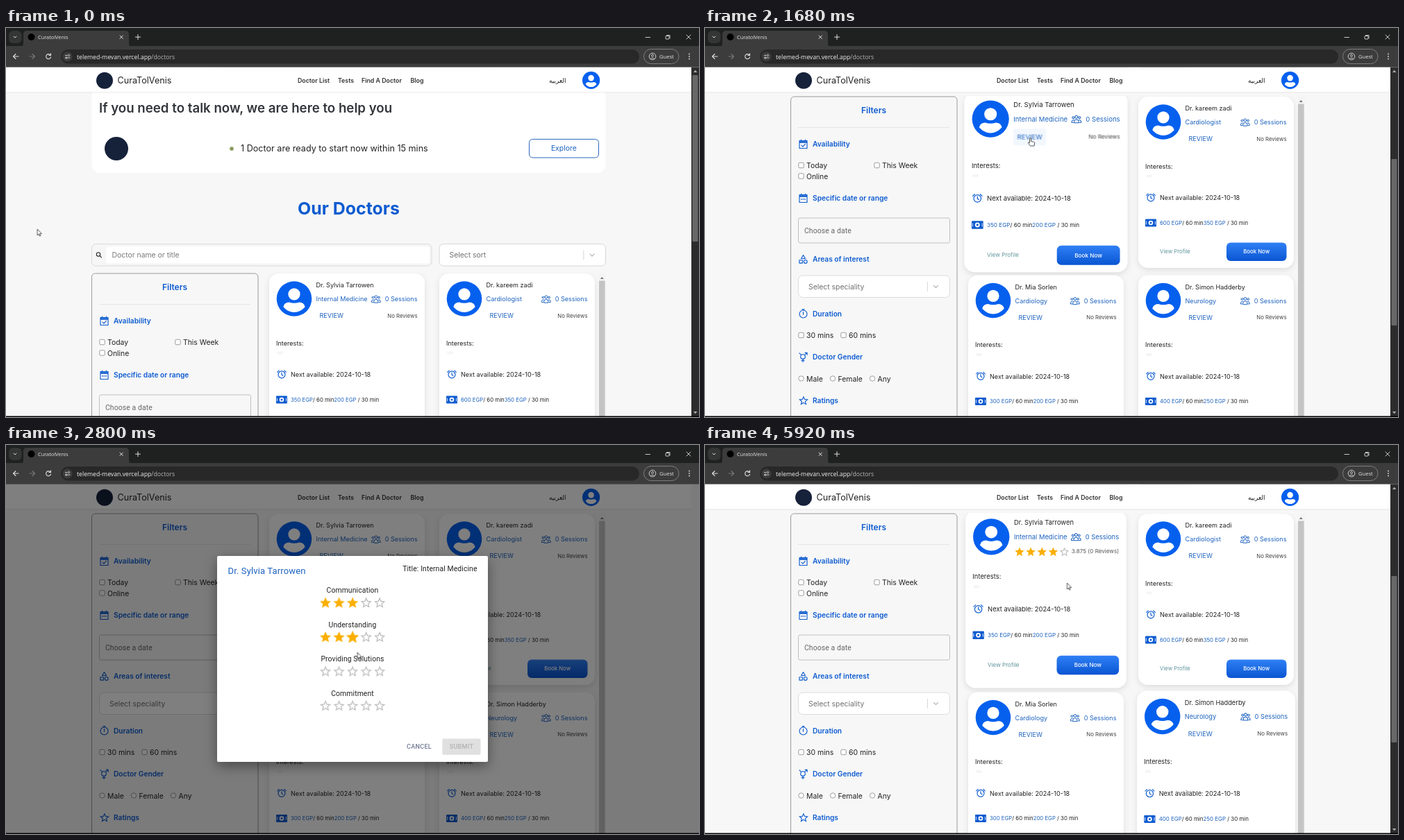
An HTML page that plays this animation: 998x561 px, repeating every 6 s.

```html
<!DOCTYPE html>
<html lang="en">
<head>
<meta charset="utf-8">
<title>Doctors</title>
<style>
  html, body { margin: 0; width: 100%; height: 100%; overflow: hidden; background: #f7f7f7; }
  svg { display: block; width: 998px; height: 561px; font-family: Inter, sans-serif; }
  .ui { font-family: "Open Sans", sans-serif; }
  .roboto { font-family: Roboto, sans-serif; letter-spacing: .1px; }
  .button { font-family: Roboto, sans-serif; font-weight: 500; letter-spacing: .26px; }
  .arabic { font-family: "DejaVu Sans", "Noto Sans", sans-serif; }
  .card { transform-origin: 112px 123.5px; }
  .star { transform-origin: 12px 12px; }
  .paper { filter: drop-shadow(0 6px 9px rgba(0, 0, 0, .4)); }
  .lift { filter: drop-shadow(0 3px 4px rgba(0, 0, 0, .1)); }
  .raised { filter: drop-shadow(0 1px 2px rgba(0, 0, 0, .35)); }
</style>
</head>
<body>
<svg id="stage" viewBox="0 0 998 561"></svg>
<script>
const DURATION = 6000, STEP = 80, SCROLL = 255;
const OPEN = 1735, CLOSE = 5500, CLOSED = 5695;
const BLUE = '#0560ee', HEAD = '#0d5bd0', LINK = '#1e63bf', INK = '#222', GOLD = '#faaf00';
const BRAND = 'CuraTolVenis';

// Markup helpers
const rect = (x, y, w, h, fill, r = 0, more = '') =>
  `<rect x="${x}" y="${y}" width="${w}" height="${h}" rx="${r}" fill="${fill}" ${more}/>`;
const circle = (x, y, r, fill, more = '') => `<circle cx="${x}" cy="${y}" r="${r}" fill="${fill}" ${more}/>`;
const text = (x, y, str, size, fill = INK, more = '') =>
  `<text x="${x}" y="${y}" font-size="${size}" fill="${fill}" ${more}>${str}</text>`;
const line = (d, color, width = 1) =>
  `<path d="${d}" fill="none" stroke="${color}" stroke-width="${width}" stroke-linecap="round" stroke-linejoin="round"/>`;
const shape = (d, fill, more = '') => `<path d="${d}" fill="${fill}" ${more}/>`;
const at = (x, y, content, scale = 1) => `<g transform="translate(${x} ${y}) scale(${scale})">${content}</g>`;
const group = (id, content, more = '') => `<g id="${id}" ${more}>${content}</g>`;
const border = (color, width = 1) => `stroke="${color}" stroke-width="${width}"`;
const MIDDLE = 'text-anchor="middle"', END = 'text-anchor="end"', SEMI = 'font-weight="600"';

const ring = (x, y, r) => `M${x - r} ${y}a${r} ${r} 0 1 0 ${2 * r} 0a${r} ${r} 0 1 0 ${-2 * r} 0`;
const CALENDAR = 'M-5.5 -5h11v11h-11zM-5.5 -2.4h11M-5.5 -3.6h11M-3 -6.4v1.4M3 -6.4v1.4';
const ICONS = {
  check: CALENDAR + 'M-2.6 1.6l2 2 3.4 -3.8',
  range: CALENDAR + 'M-3 1.4h1M-.5 1.4h1M2 1.4h1',
  shapes: 'M0 -6l3 5h-6zM-5.6 1.2h4.4v4.4h-4.4z' + ring(3.2, 3.4, 2.4),
  clock: ring(0, 0, 5.5) + 'M0 -3v3.8M-1.5 -6.6h3',
  gender: ring(-.5, -.8, 3.3) + 'M2 -3.2l3.5 -3.3M2.6 -6.5h3v3M-.5 2.6v4.2M-2.5 4.8h4M-3 -3.4l-2.6 -2.6',
  people: ring(0, -3, 1.9) + ring(-4.3, -2.2, 1.4) + ring(4.3, -2.2, 1.4) +
    'M-3 5v-1.5a3 3 0 0 1 6 0v1.5zM-3.6 1.2a2.5 2.5 0 0 0 -2.9 2.4v1h2.4M3.6 1.2a2.5 2.5 0 0 1 2.9 2.4v1h-2.4',
  alarm: ring(0, .3, 5) + 'M0 -2.5v3l2 1.3M-6.3 -3.2l2.5 -2.4M6.3 -3.2l-2.5 -2.4',
  chevron: 'M-3 -1.5l3 3 3 -3'
};
const icon = (name, x, y, color = HEAD, width = 1.15) => at(x, y, line(ICONS[name], color, width));

const STAR = 'M12 17.27 18.18 21 16.54 13.97 22 9.24 14.81 8.63 12 2 9.19 8.63 2 9.24 7.46 13.97 5.82 21z';
const HALF_STAR = 'M12 17.27 5.82 21 7.46 13.97 2 9.24 9.19 8.63 12 2z';
const STAR_LINE = STAR + 'M12 15.4 8.24 17.67 9.24 13.39 5.92 10.51 10.3 10.13 12 6.1 13.71 10.14 18.09 10.52 14.77 13.4 15.77 17.68z';
const starLine = (color, more = '') => shape(STAR_LINE, color, 'fill-rule="evenodd" ' + more);

const avatar = (x, y, r) => at(x, y, circle(0, 0, 1, BLUE) + circle(0, -.26, .34, '#fff') +
  shape('M-.62 .46Q-.56 .2 -.29 .2Q0 .3 .29 .2Q.56 .2 .62 .46Q.34 .77 0 .77Q-.34 .77 -.62 .46Z', '#fff'), r);
const tick = (x, y, label, lx) =>
  rect(x - 3.7, y - 3.7, 7.4, 7.4, '#fff', 1.4, border('#767676', .7)) + text(lx, y + 4.1, label, 10.4);
const radio = (x, y, label, lx) => circle(x, y, 3.7, '#fff', border('#767676', .7)) + text(lx, y + 4.1, label, 10.4);
const heading = (name, y, label) => icon(name, 141.5, y) + text(155, y + 3.6, label, 10.2, HEAD, SEMI);

// Browser frame
const browser = () =>
  rect(0, 0, 998, 27, '#1f2020') + rect(0, 26, 998, 30.5, '#3c3c3c') +
  rect(4, 4, 18.5, 18, '#343535', 6) + at(13, 13, line('M-2 -1l2 2 2 -2', '#ddd')) +
  shape('M21 26.5q4 0 4 -4v-13q0 -5.500 5 -5.500h142q5 0 5 5.500v13q0 4 4 4z', '#3c3c3c') +
  circle(36.5, 13, 5, '#000') + text(46, 16, 'CuratolVenis', 7.4, '#e6e6e6', 'class="ui"') +
  line('M164 11l4.400 4.400M168.400 11l-4.400 4.400M190 9.600v7M186.500 13.100h7', '#ddd') +
  line('M921 13.500h6.500M980 10l6 6M986 10l-6 6M951.500 10.500h4.500v4.500', '#ddd', .9) +
  rect(950, 11.5, 5, 4.5, 'none', 1, border('#ddd', .9)) +
  line('M18 41h-7.500M14 37.500l-3.500 3.500 3.500 3.500', '#ddd', 1.1) +
  line('M34 41h7.500M38 37.500l3.500 3.500 -3.500 3.500', '#777', 1.1) +
  line('M64 39a3.500 3.500 0 1 0 .6 3M64.500 36.800v2.600h-2.600', '#ddd', 1.1) +
  rect(79, 31, 833, 20.500, '#282828', 10.2) + circle(88.500, 41.2, 7, '#3c3c3c') +
  line('M85.500 39.500h2.500M85.500 43h1M89 43h3', '#ddd', .9) +
  circle(90.500, 39.500, 1.2, 'none', border('#ddd', .8)) + circle(87, 43, 1.2, 'none', border('#ddd', .8)) +
  text(102, 44.6, 'telemed-mevan.vercel.app<tspan fill="#b4b4b4">/doctors</tspan>', 8.7, '#f0f0f0', 'class="ui"') +
  rect(918.500, 30.500, 50.500, 21, 'none', 10.500, border('#7d7d7d')) +
  circle(931, 41, 4.8, 'none', border('#ddd', .9)) + circle(931, 39.8, 1.5, 'none', border('#ddd', .8)) +
  line('M928 44.300q3 -2.500 6 0', '#ddd', .8) + text(941, 44, 'Guest', 7.6, '#e6e6e6', 'class="ui"') +
  [37.500, 41, 44.500].map(y => circle(984, y, .9, '#ddd')).join('') +
  rect(0, 559.6, 998, 1.4, '#000');

const header = () =>
  rect(0, 56.5, 987, 36, '#fff') + rect(0, 92.500, 987, .8, '#e2e2e2') +
  circle(142, 75.8, 12, '#16213a') + text(160.500, 80.2, BRAND, 12.6) +
  [[420, 'Doctor List'], [478, 'Tests'], [512, 'Find A Doctor'], [582.5, 'Blog']]
    .map(([x, label]) => text(x, 79, label, 8.8, '#333', SEMI)).join('') +
  text(782, 78.5, 'العربيه', 9, INK, 'class="arabic"') + avatar(842.6, 75.4, 12.6);

// Upper part of the page, in unscrolled coordinates
const intro = () =>
  rect(123.5, 85, 740, 124, '#fff', 12) +
  text(134, 122, 'If you need to talk now, we are here to help you', 18.7, '#33363b', SEMI) +
  circle(159, 174, 17, '#16213a') + circle(325, 174, 3.6, '#e3e8d2') + circle(325, 174, 2.6, '#86975a') +
  text(338, 178.2, '1 Doctor are ready to start now within 15 mins', 12.6) +
  rect(753.5, 160.4, 100, 26.6, '#fff', 5, border('#2a66bd')) + text(803.3, 177.3, 'Explore', 10.4, LINK, MIDDLE) +
  text(493.5, 269.3, 'Our Doctors', 24.9, HEAD, MIDDLE + ' font-weight="700"') +
  rect(123.5, 311.5, 489.500, 31.5, '#f6f6f6', 6, border('#dadada')) + rect(144, 315.500, 466, 24, '#fff', 3) +
  line(ring(133, 326.5, 2.7) + 'M135.100 328.600l2.300 2.300', '#222', 1.1) +
  text(152.5, 331, 'Doctor name or title', 10.4, '#7a7a7a') +
  rect(624, 311.5, 239.5, 31.5, '#fff', 6, border('#d6d6d6')) + text(638.5, 331, 'Select sort', 10.4, '#707070') +
  line('M831.800 321v13', '#ccc', .8) + icon('chevron', 844, 327.500, '#bbb', 1.3);

const filters = () =>
  rect(123.5, 99, 239.5, 520, '#f7f7f7', 5, border('#9a9a9a')) +
  text(243, 123.2, 'Filters', 12, HEAD, SEMI + ' ' + MIDDLE) + rect(134, 143.3, 218, .7, '#dedede') +
  heading('check', 167.5, 'Availability') +
  tick(138.5, 198, 'Today', 146) + tick(247.5, 198, 'This Week', 255) + tick(138.5, 213.5, 'Online', 146) +
  heading('range', 245.500, 'Specific date or range') +
  rect(134.500, 274, 218, 36, '#f7f7f7', 2.5, border('#c0c0c0')) +
  text(143, 295.6, 'Choose a date', 10.4, '#666', 'class="roboto"') +
  heading('shapes', 333.5, 'Areas of interest') +
  rect(134.500, 357, 218, 31.5, '#fff', 6, border('#dcdcdc')) + text(149, 376.7, 'Select speciality', 10.4, '#707070') +
  line('M320.500 366.500v13', '#ccc', .8) + icon('chevron', 332.5, 373, '#bbb', 1.3) +
  heading('clock', 412.5, 'Duration') + tick(138.5, 443, '30 mins', 146) + tick(199.5, 443, '60 mins', 207) +
  heading('gender', 474.8, 'Doctor Gender') +
  radio(138.5, 505.5, 'Male', 146) + radio(184, 505.5, 'Female', 191.5) + radio(241, 505.5, 'Any', 248.5) +
  at(133.5, 529, starLine(HEAD), .7) + text(155, 541, 'Ratings', 10.2, HEAD, SEMI);

const rated = () =>
  [0, 1, 2, 3, 4].map(i => at(67.5 + 15.6 * i, 49.7, i < 4 ? shape(STAR, GOLD) : starLine('#bdbdbd'), .65)).join('') +
  text(213.5, 59.8, '3.875 (0 Reviews)', 7.8, '#555', END);

const card = ({ x, y, name, field, long, short }, n) => at(x, y, group('card' + n,
  rect(0, 0, 224, 247, '#fff', 14, 'class="lift"') + avatar(36, 36.5, 25.3) +
  text(67.5, 20.1, name, 9.1) + text(67.5, 40, field, 9.1, LINK) +
  icon('people', 153.8, 36.8, LINK, 1) + text(213.5, 40, '0 Sessions', 9.1, LINK, END) +
  group('plain' + n,
    (n ? '' : rect(67, 49.7, 45, 23, '#1976d2', 3, 'id="reviewHover" fill-opacity=".06"')) +
    text(72.5, 64.2, 'REVIEW', 9.1, LINK) + text(213.5, 63.6, 'No Reviews', 7.8, '#444', END)) +
  (n ? '' : group('rated', rated())) +
  group('lower' + n,
    text(10, 103.8, 'Interests:', 9.1) + rect(11, 112.5, 9, 4, '#f5f5f5', 2) +
    icon('alarm', 18, 145.5) + text(31, 149, 'Next available: 2024-10-18', 9.1) +
    rect(10, 176.500, 16, 11, HEAD, 1) + circle(18, 182, 3.3, '#fff') + circle(18, 182, 1.5, HEAD) +
    line('M11.500 180v4M24.500 180v4', '#fff', .8) +
    text(31, 184.8, `<tspan fill="${LINK}">${long} EGP</tspan>/ 60 min<tspan fill="${LINK}">${short} EGP</tspan> / 30 min`, 7.8) +
    text(31, 226.3, 'View Profile', 7.8, '#5f959c') +
    rect(127, 210.5, 86.5, 26.5, 'url(#book)', 6) +
    text(170.2, 226.4, 'Book Now', 7.8, '#fff', MIDDLE + ' font-weight="500"')),
  'class="card"'));

const DOCTORS = [
  { x: 379, y: 99, name: 'Dr. Sylvia Tarrowen', field: 'Internal Medicine', long: 350, short: 200 },
  { x: 624, y: 99, name: 'Dr. kareem zadi', field: 'Cardiologist', long: 600, short: 350 },
  { x: 379, y: 356.5, name: 'Dr. Mia Sorlen', field: 'Cardiology', long: 300, short: 200 },
  { x: 624, y: 356.5, name: 'Dr. Simon Hadderby', field: 'Neurology', long: 400, short: 250 }
];

const page = () => group('page',
  at(0, -SCROLL, intro()) + filters() +
  `<g clip-path="url(#list)">${DOCTORS.map(card).join('')}</g>` +
  rect(854, 99, 9.5, 500, '#f4f4f4') + rect(854, 109.5, 8.6, 500, '#c4c4c4') +
  shape('M855.800 107l2.500 -3 2.500 3z', '#777'));

const scrollbar = () => group('bar',
  rect(987, 56.5, 11, 505, '#2c2c2c') + group('thumb', rect(988.500, 68, 8, 240, '#686868', 1)) +
  shape('M990 64l2.700 -3.500 2.700 3.500z', '#aaa') + shape('M990 553l2.700 3.500 2.700 -3.500z', '#aaa'));

// Rating dialog: fill time of each star, and the star that grows under the cursor
const ROWS = [
  { label: 'Communication', fills: [2160, 2160, 2240], hover: [2, 2220, 2400] },
  { label: 'Understanding', fills: [2400, 2400, 2480], hover: [2, 2460, 2760] },
  { label: 'Providing Solutions', fills: [2880, 2880, 2960, 2960, 3040], half: 4, hover: [4, 3020, 3280] },
  { label: 'Commitment', fills: [3360, 3360, 3360, 3360, 3360], hover: [4, 3340, 3520] }
];
const ratingRow = ({ label, half }, r) =>
  text(499, 213.2 + 49.5 * r, label, 10.4, INK, `class="roboto" ${MIDDLE}`) +
  [0, 1, 2, 3, 4].map(i => at(450.2 + 19.55 * i, 217.7 + 49.5 * r, group(`star${r}${i}`,
    starLine('#bdbdbd', `id="empty${r}${i}"`) +
    shape(half === i ? HALF_STAR : STAR, GOLD, `id="full${r}${i}" opacity="0"`), 'class="star"'), .817)).join('');

const submit = (fill, ink, more = '') =>
  rect(628.3, 423.5, 55.2, 23.3, fill, 2, more) + text(656, 438.300, 'SUBMIT', 9.1, ink, `class="button" ${MIDDLE}`);

const dialog = () => group('dialog',
  rect(304, 160, 390, 297, '#fff', 2, 'class="paper"') +
  text(319.5, 185.5, DOCTORS[0].name, 13.1, LINK, 'class="roboto"') +
  text(678.5, 182, 'Title: Internal Medicine', 10.4, INK, `class="roboto" ${END}`) +
  ROWS.map(ratingRow).join('') +
  text(595, 438.300, 'CANCEL', 9.1, '#6f7a92', `class="button" ${MIDDLE}`) +
  group('disabled', submit('#e0e0e0', '#b2b2b2')) +
  group('enabled', submit('#2070d3', '#fff', 'class="raised"')) +
  rect(628.3, 423.5, 55.2, 23.3, '#fff', 2, 'id="submitHover"'));

const cursor = () => group('cursor',
  group('arrow', shape('M0 0v9l2.100 -1.900 1.300 3.100 1.300 -.6 -1.300 -3h2.800z', '#fff', border('#222', .75))) +
  group('hand', at(1.5, 0, shape('M-1 1a1 1 0 0 1 2 0v4l4 .8q1.500 .4 1.200 2l-.7 3.900h-5.500l-3 -4.200q-.3 -1.500 1 -1.100l1 1z',
    '#fff', border('#222', .8)))));

document.getElementById('stage').innerHTML = `<defs>
  <linearGradient id="book" x2="0" y2="1"><stop stop-color="#2f80f5"/><stop offset="1" stop-color="#0a55d2"/></linearGradient>
  <clipPath id="list"><path d="M366 98h488v520h-488z"/></clipPath></defs>` +
  rect(0, 0, 998, 561, '#f7f7f7') + page() + header() + scrollbar() +
  rect(0, 56, 998, 505, '#000', 0, 'id="shade"') + dialog() + browser() + cursor();

// Timelines: [time, properties, easing to the next entry]
const timelines = [];
function animate(id, steps) {
  const keys = steps.map(([t, props, easing = 'linear']) => ({ ...props, easing, offset: t / DURATION }));
  if (keys[0].offset > 0) keys.unshift({ ...keys[0], easing: 'linear', offset: 0 });
  if (keys.at(-1).offset < 1) keys.push({ ...keys.at(-1), offset: 1 });
  const timeline = document.getElementById(id).animate(keys, { duration: DURATION, fill: 'both' });
  timeline.pause();
  timelines.push(timeline);
}
const move = (x, y) => ({ transform: `translate(${x}px, ${y}px)` });
const scale = s => ({ transform: `scale(${s})` });
const fade = opacity => ({ opacity });
const show = (id, from, to = DURATION) =>
  animate(id, [[0, fade(0), 'step-end'], [from, fade(1), 'step-end'], [to, fade(0)]]);

const STANDARD = 'cubic-bezier(.4, 0, .2, 1)';
animate('page', [[100, move(0, SCROLL), 'ease-in-out'], [640, move(0, 0)]]);
animate('thumb', [[100, move(0, 0), 'ease-in-out'], [640, move(0, 121)]]);
animate('card0', [[700, scale(1), 'ease'], [980, scale(1.05)], [OPEN, scale(1.05), 'ease'], [2035, scale(1)],
  [5790, scale(1)], [5920, scale(1.036)], [6000, scale(1.048)]]);
animate('card3', [[5590, scale(1), 'ease'], [5790, scale(1.05)], [5920, scale(1.017)], [6000, scale(1.004)]]);
show('reviewHover', 880, OPEN);
show('plain0', 0, CLOSE);
show('rated', CLOSE);
animate('lower0', [[0, move(0, 0), 'step-end'], [CLOSE, move(0, -8.5)]]);

show('bar', 0, OPEN);
animate('bar', [[0, fade(1), 'step-end'], [OPEN, fade(0), 'step-end'], [CLOSED, fade(1)]]);
animate('shade', [[OPEN, fade(0), STANDARD], [OPEN + 225, fade(.5)], [CLOSE, fade(.5), STANDARD], [CLOSED, fade(0)]]);
animate('dialog', [[OPEN, move(0, -420), 'cubic-bezier(0, 0, .2, 1)'], [OPEN + 225, move(0, 0)],
  [CLOSE, move(0, 0), 'cubic-bezier(.4, 0, .6, 1)'], [CLOSED, move(0, -420)]]);
ROWS.forEach(({ fills, half, hover: [index, from, to] }, r) => {
  fills.forEach((t, i) => {
    show(`full${r}${i}`, t);
    if (i !== half) show(`empty${r}${i}`, 0, t);
  });
  animate(`star${r}${index}`, [[from, scale(1)], [from + 150, scale(1.2)], [to, scale(1.2)], [to + 150, scale(1)]]);
});
show('disabled', 0, 4000);
show('enabled', 4000);
animate('submitHover', [[4600, fade(0)], [4880, fade(.23)]]);

show('hand', 880, 1760);
animate('arrow', [[0, fade(1), 'step-end'], [880, fade(0), 'step-end'], [1760, fade(1)]]);
animate('cursor', [
  [0, 45, 290], [80, 60, 294], [640, 721, 407], [720, 580, 290], [880, 478, 180], [960, 467, 161],
  [1200, 467, 159], [2000, 467, 158], [2080, 478, 192], [2240, 501, 226], [2320, 501, 226], [2480, 502, 274],
  [2700, 502, 276], [2800, 506, 299], [2960, 525, 322], [3120, 540, 325], [3200, 540, 325], [3360, 540, 374],
  [3520, 542, 375], [3840, 612, 393], [4000, 610, 390], [4320, 592.5, 355.5], [4560, 630, 424], [4880, 648, 435],
  [5280, 651, 436], [5700, 651, 436], [5920, 521.5, 199]
].map(([t, x, y]) => [t, move(x, y)]));

const start = performance.now();
function frame() {
  const elapsed = (performance.now() - start) % DURATION;
  const time = Math.floor(elapsed / STEP) * STEP + 1;
  timelines.forEach(timeline => { timeline.currentTime = time; });
  requestAnimationFrame(frame);
}
frame();
</script>
</body>
</html>
```
